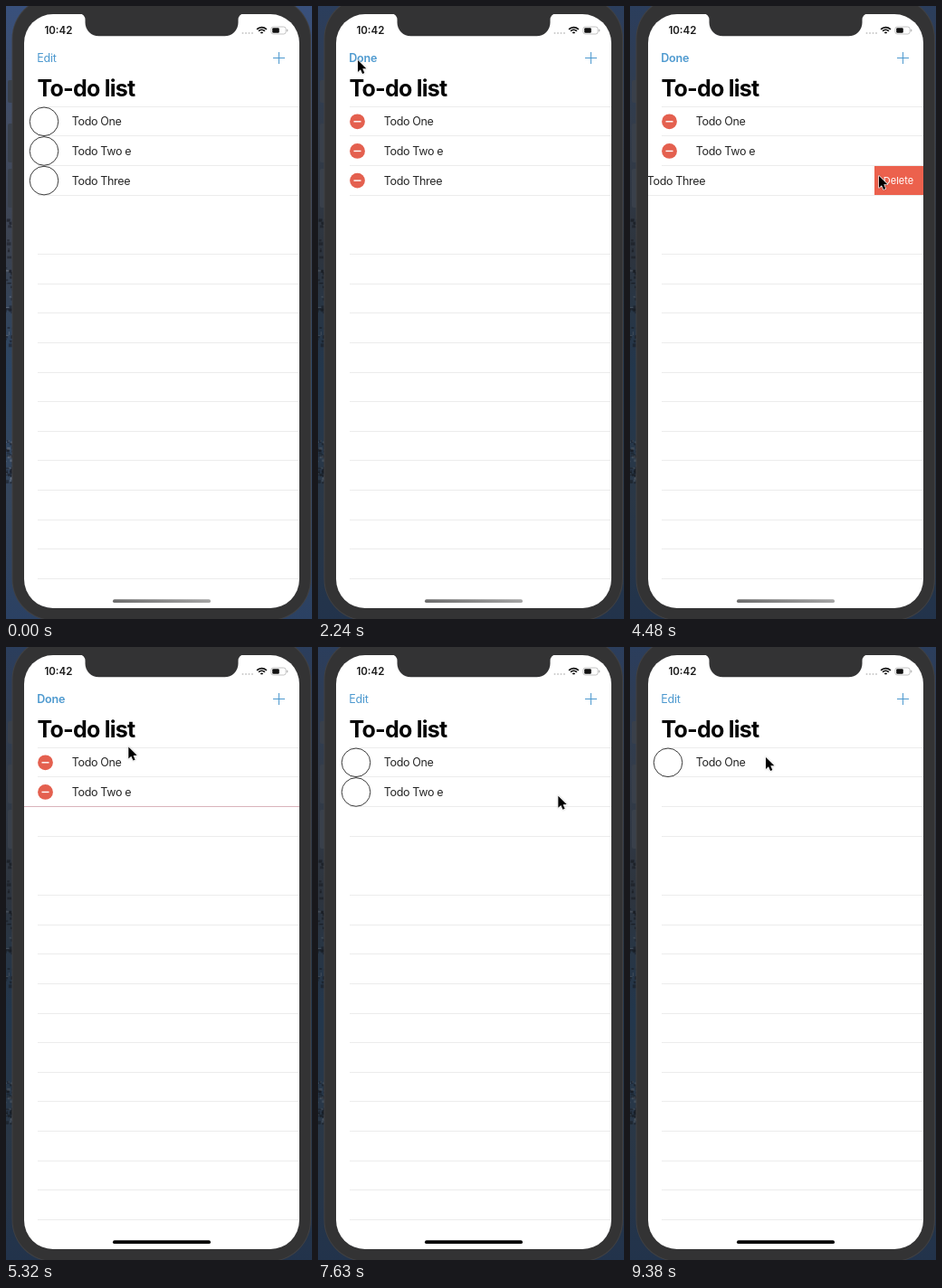
An HTML page with a canvas that plays this animation: 338x678 px, repeating every 9450 ms.

```html
<!DOCTYPE html>
<html lang="en">
<head>
<meta charset="utf-8">
<title>To-do list</title>
<style>
html, body { margin: 0; width: 100%; height: 100%; overflow: hidden; background: #333; }
canvas { display: block; width: 338px; height: 678px; }
</style>
</head>
<body>
<canvas id="stage"></canvas>
<script>
const W = 338, H = 678, LOOP = 9450, STEP = 70;
const LEFT = 20, RIGHT = 324, INSET = 35, ROW = 32.65, TOP = 111;
const BLUE = '#4d99cf', RED = '#ec614d', LINE = '#ececec', BEZEL = '#333334';
const BUTTON = 54;
const FONT = 'Inter, "Liberation Sans", sans-serif';
const EDIT_ON = 1850, EDIT_OFF = 5780;

const ROWS = [
  { label: 'Todo One', open: Infinity, remove: Infinity, pull: 0 },
  { label: 'Todo Two e', open: 7920, remove: 8750, pull: 10 },
  { label: 'Todo Three', open: 3780, remove: 4830, pull: 0 }
];

// Cursor stops: arrival time and place
const EDIT_BUTTON = [44, 60];
const STOPS = [
  [0, [-15, 230]],
  [1120, EDIT_BUTTON],
  [3250, [40, 189]],
  [4340, [275, 188]],
  [5575, EDIT_BUTTON],
  [6790, [195.5, 163]],
  [7800, [310, 166]],
  [8260, [254, 166]],
  [8560, [283, 163]],
  [9380, [150, 122]]
];

const canvas = document.getElementById('stage');
const c = canvas.getContext('2d');
const dpr = window.devicePixelRatio || 1;
canvas.width = W * dpr;
canvas.height = H * dpr;

const ramp = (t, from, span) => Math.min(1, Math.max(0, (t - from) / span));
function ease(t, from, span) {
  const p = ramp(t, from, span);
  return p * p * (3 - 2 * p);
}

function rect(x, y, w, h, color) {
  c.fillStyle = color;
  c.fillRect(x, y, w, h);
}

function pill(x, y, w, h, r, color) {
  c.beginPath();
  c.roundRect(x, y, w, h, r);
  c.fillStyle = color;
  c.fill();
}

function dot(x, y, r, color) {
  c.beginPath();
  c.arc(x, y, r, 0, 2 * Math.PI);
  c.fillStyle = color;
  c.fill();
}

function text(str, x, y, size, weight, color, spacing = 0) {
  c.font = `${weight} ${size}px ${FONT}`;
  c.letterSpacing = spacing + 'px';
  c.fillStyle = color;
  c.fillText(str, x, y);
}

function hline(x, y, color) {
  rect(x, Math.round(y - .3), RIGHT - x, 1, color);
}

function wallpaper(t) {
  const colors = ['#38507c', '#434d62', '#3b4250', '#2c4665', '#36465c', '#2b4163'];
  const g = c.createLinearGradient(0, 0, 0, H);
  colors.forEach((color, i) => g.addColorStop(i / (colors.length - 1), color));
  rect(0, 0, W, H, g);
  // Trees above, shoreline rocks below
  let seed = 7;
  const rnd = () => (seed = seed * 16807 % 2147483647) / 2147483647;
  for (let i = 0; i < 90; i++) {
    const y = i % 2 ? 235 + rnd() * 140 : 480 + rnd() * 48;
    const color = rnd() < .3 ? 'rgba(150,155,165,.35)' : 'rgba(22,25,32,.5)';
    rect(rnd() * 8 - 1, y, 1 + rnd() * 4, 1 + rnd() * 3, color);
  }
  if (t >= 1610) rect(0, 0, W, H, 'rgba(14,20,22,.3)');
}

function shell() {
  pill(2, 82, 8, 25, 2, '#39404b');
  for (const y of [130, 180]) pill(2, y, 8, 43, 2, '#39404b');
  pill(6.5, -10, 330.5, 690, 46, '#414143');
  pill(7.5, -9, 328.5, 688, 45, BEZEL);
  pill(LEFT, 9, RIGHT - LEFT, 657, 32, '#fff');
  // Notch with flared top corners
  c.beginPath();
  c.moveTo(80, 8);
  c.arcTo(87.5, 9, 87.5, 18, 7);
  c.arcTo(87.5, 33.3, 110, 33.3, 15);
  c.arcTo(256.5, 33.3, 256.5, 18, 15);
  c.arcTo(256.5, 9, 264, 8, 7);
  c.lineTo(264, 8);
  c.fillStyle = BEZEL;
  c.fill();
}

function statusBar() {
  text('10:42', 42.4, 31.3, 11.5, 600, '#1a1a1a');
  for (let i = 0; i < 4; i++) dot(261.5 + i * 3.5, 30, 1, '#cacaca');
  c.strokeStyle = '#111';
  c.lineWidth = 1.7;
  for (const r of [7.4, 4.7, 1.6]) {
    c.beginPath();
    c.arc(282.5, 31, r, -Math.PI * .76, -Math.PI * .24);
    c.stroke();
  }
  c.beginPath();
  c.roundRect(292.9, 23, 16.2, 8, 2.4);
  c.lineWidth = .8;
  c.strokeStyle = '#b4b4b4';
  c.stroke();
  pill(294.2, 24.3, 7.6, 5.4, 1.2, '#111');
  pill(310.1, 25.6, 1.2, 2.8, .6, '#b4b4b4');
}

function header(done) {
  text(done ? 'Done' : 'Edit', 34.2, 62, 12.5, done ? 600 : 400, BLUE, -.2);
  rect(295, 57, 13, 1, BLUE);
  rect(301, 51, 1, 13, BLUE);
  text('To-do list', 34.5, 100, 25, 700, '#050505', -.75);
}

// Ring outside edit mode, minus badge inside it
function marker(y, editing) {
  c.save();
  c.globalAlpha = 1 - editing;
  c.beginPath();
  c.arc(42, y, 15.8, 0, 2 * Math.PI);
  c.lineWidth = 1;
  c.strokeStyle = '#3c3c3c';
  c.stroke();
  c.globalAlpha = editing;
  const x = 43.5 - 16 * (1 - editing);
  dot(x, y, 8.4, '#e4604f');
  rect(x - 4, y - .7, 8, 1.4, '#fff');
  c.restore();
}

function drawRow({ label, open, remove, pull }, index, editing, t) {
  const size = 1 - ease(t, remove + 140, 340);
  if (size <= 0) return;
  const offset = BUTTON * ease(t, open, 320)
    + pull * Math.sin(Math.PI * ramp(t, open + 140, 400))
    + (RIGHT - LEFT - BUTTON) * ease(t, remove, 250);
  const y = TOP + index * ROW, mid = y + 16.8;
  c.save();
  c.beginPath();
  c.rect(LEFT, y, RIGHT - LEFT, (ROW + 1) * size);
  c.clip();
  c.translate(-offset, 0);
  marker(mid, editing);
  text(label, 72.7, mid + 4.5, 12.5, 400, '#262626', -.33);
  c.translate(offset, 0);
  if (offset > 0) {
    hline(Math.max(LEFT, INSET - offset), y + ROW, LINE);
    c.beginPath();
    c.rect(RIGHT - offset, Math.round(y + .7), offset, 32);
    c.clip();
    rect(LEFT, y, RIGHT - LEFT, ROW + 1, RED);
    text('Delete', 279.8, mid + 4, 11, 400, '#fff');
  }
  c.restore();
}

// Each leg ends at its arrival time; longer legs take longer
function cursorAt(t) {
  let [x, y] = STOPS[0][1];
  for (const [arrive, [nx, ny]] of STOPS.slice(1)) {
    const span = 250 + Math.hypot(nx - x, ny - y) * 1.3;
    const p = ease(t, arrive - span, span);
    if (p < 1) return [x + (nx - x) * p, y + (ny - y) * p];
    [x, y] = [nx, ny];
  }
  return [x, y];
}

function cursor(t) {
  const [x, y] = cursorAt(t);
  const arrow = new Path2D('M0 0V15.2L3.5 12 6 17.6 8.6 16.5 6.2 11 11 10.8Z');
  c.save();
  c.translate(x, y);
  c.scale(.85, .85);
  c.lineJoin = 'round';
  c.lineWidth = 1.6;
  c.strokeStyle = '#fff';
  c.shadowColor = 'rgba(0,0,0,.25)';
  c.shadowBlur = 2 * dpr;
  c.stroke(arrow);
  c.shadowColor = 'transparent';
  c.fillStyle = '#000';
  c.fill(arrow);
  c.restore();
}

function homeBar(t) {
  const g = c.createLinearGradient(118, 0, 226, 0);
  g.addColorStop(0, '#6c6c6c');
  g.addColorStop(1, '#a4a4a4');
  pill(118, 656.3, 108, 3.7, 1.85, t < 4900 ? g : '#000');
}

function draw(t) {
  c.setTransform(dpr, 0, 0, dpr, 0, 0);
  wallpaper(t);
  shell();
  statusBar();
  const swiping = ROWS[1];
  header((t >= EDIT_ON && t < EDIT_OFF) || (t >= swiping.open && t < swiping.remove + 480));
  for (let i = 0; i < 17; i++) {
    if (i !== 4) hline(INSET, TOP + i * ROW, LINE);
  }
  const editing = ease(t, EDIT_ON, 300) - ease(t, EDIT_OFF, 300);
  ROWS.forEach((row, i) => {
    drawRow(row, i, editing, t);
    // Thin trace where a row has just collapsed
    const gone = t - row.remove - 480;
    if (gone >= 0 && gone < STEP) hline(LEFT, TOP + i * ROW, '#d9b3bb');
  });
  homeBar(t);
  cursor(t);
}

const start = performance.now();
function tick() {
  const t = (performance.now() - start) % LOOP;
  draw(Math.floor(t / STEP) * STEP);
  requestAnimationFrame(tick);
}
tick();
</script>
</body>
</html>
```
